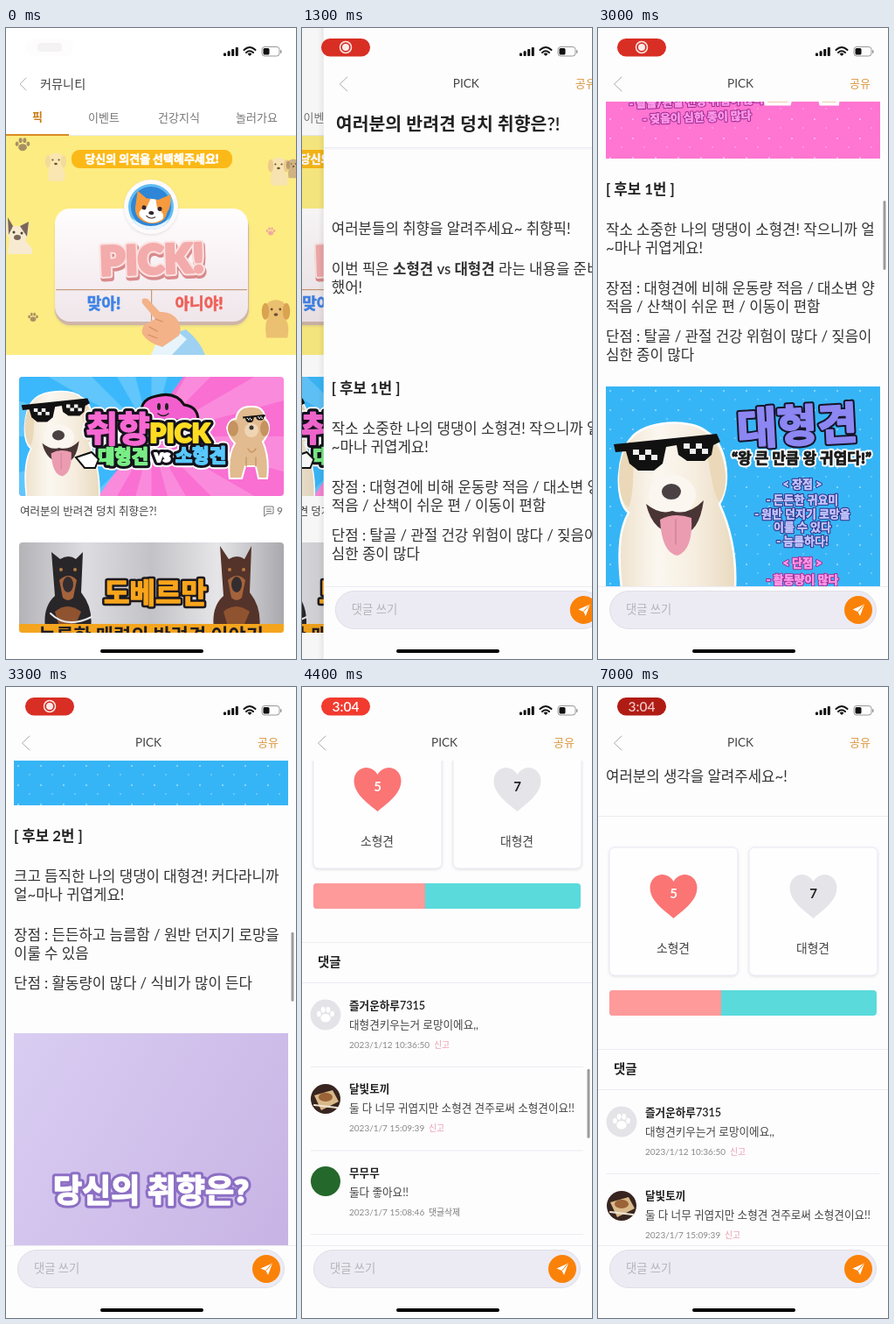
Write an HTML page that moves like this. It is 332 by 720 pixels and loops after 7100 ms.

```html
<!DOCTYPE html>
<html lang="ko">
<head>
<meta charset="utf-8">
<style>
html, body { margin: 0; width: 100%; height: 100%; overflow: hidden; background: #fff }
svg { display: block; width: 332px; height: 720px; font-family: Lato, 'Noto Sans CJK KR', 'Noto Sans CJK', sans-serif }
text { white-space: pre }
</style>
</head>
<body>
<svg id="stage" viewBox="0 0 332 720"></svg>
<script>
const LOOP = 7100;

// Drawing helpers: each returns SVG markup.
const rect = (x, y, w, h, fill, r = 0, more = '') =>
  `<rect x="${x}" y="${y}" width="${w}" height="${h}" rx="${r}" fill="${fill}" ${more}/>`;
const oval = (x, y, rx, ry, fill, more = '') =>
  `<ellipse cx="${x}" cy="${y}" rx="${rx}" ry="${ry}" fill="${fill}" ${more}/>`;
const disc = (x, y, r, fill, more) => oval(x, y, r, r, fill, more);
const path = (d, fill, more = '') => `<path d="${d}" fill="${fill}" ${more}/>`;
const line = (d, color, w = 1) => path(d, 'none', `stroke="${color}" stroke-width="${w}" stroke-linecap="round" stroke-linejoin="round"`);
const group = (transform, body, more = '') => `<g transform="${transform}" ${more}>${body}</g>`;
const text = (s, x, y, size, fill = '#333', weight = 400, anchor = 'start', more = '') =>
  `<text x="${x}" y="${y + size * .36}" font-size="${size}" fill="${fill}" font-weight="${weight}" text-anchor="${anchor}" ${more}>${s}</text>`;
const mid = (s, x, y, size, fill, weight, more) => text(s, x, y, size, fill, weight, 'middle', more);
const stroked = (s, x, y, size, color, w) =>
  mid(s, x, y, size, color, 900, `stroke="${color}" stroke-width="${w}" stroke-linejoin="round"`);
// Heavy lettering: thickened glyphs over a wider edge.
const outlined = (s, x, y, size, fill, edge = '#111', w = 4) => {
  const bold = size * .045;
  return stroked(s, x, y, size, edge, w + bold) + stroked(s, x, y, size, fill, bold);
};
const rule = (y, x = 0, w = 332) => rect(x, y, w, 1, '#ececf1');

const paw = (x, y, s, fill) => group(`translate(${x} ${y}) scale(${s})`,
  oval(0, 4, 6, 5, fill) + oval(-8, -1, 2.4, 3.4, fill) + oval(-3, -6, 2.5, 3.6, fill) +
  oval(3, -6, 2.5, 3.6, fill) + oval(8, -1, 2.4, 3.4, fill));
const heart = (x, y, s, fill) => group(`translate(${x} ${y}) scale(${s})`,
  path('M0 25C-9 17-27 6-27-10C-27-20-19-25-13-25C-7-25-2-21 0-17C2-21 7-25 13-25C19-25 27-20 27-10C27 6 9 17 0 25Z', fill));
const star = (x, y, r, fill) => {
  const points = Array.from({ length: 10 }, (_, i) => {
    const a = i * Math.PI / 5 - 1.4, d = i % 2 ? r / 2 : r;
    return `${(x + d * Math.cos(a)).toFixed(1)},${(y + d * Math.sin(a)).toFixed(1)}`;
  });
  return `<polygon points="${points.join(' ')}" fill="${fill}" stroke="${fill}" stroke-width="2" stroke-linejoin="round"/>`;
};
const rays = (cx, cy, radius, fill) => path(Array.from({ length: 12 }, (_, i) => {
  const at = a => `L${(cx + radius * Math.cos(a)).toFixed(1)} ${(cy + radius * Math.sin(a)).toFixed(1)}`;
  return `M${cx} ${cy}${at(i * Math.PI / 6)}${at(i * Math.PI / 6 + .26)}Z`;
}).join(''), fill);
const shades = (x, y, w) => group(`translate(${x} ${y}) scale(${w / 122})`,
  path('M0 12L118 0L122 9L114 13L112 24L104 31H84L74 24L72 13L60 15L56 34L46 42H28L18 34L14 20L2 21Z', '#111') +
  path('M22 18h7v6h7v6h-7v-6h-7zM36 18h7v6h7v6h-7v-6h-7zM80 11h7v6h7v6h-7v-6h-7zM94 11h7v6h7v6h-7v-6h-7z', '#eee'));

// Head and chest, drawn on a 150 x 230 area.
const labrador =
  path('M18 230C12 180 18 158 26 144C8 130 14 74 28 60C44 38 98 36 116 52C136 62 146 108 130 134C142 160 150 190 148 230Z', 'url(#fur)', 'stroke="#fff" stroke-width="2.5"') +
  path('M28 62C12 80 10 126 26 138C34 118 29 88 35 70ZM116 56C138 72 143 116 130 132C119 116 121 86 111 64Z', '#ead8b8') +
  oval(76, 124, 27, 23, '#fbf7f0') +
  path('M46 134Q62 147 76 142Q94 148 112 130Q106 172 82 168Q54 168 46 134Z', '#4a3535') +
  path('M62 152Q78 143 98 150Q100 186 82 193Q64 190 62 152Z', '#eb9cb0') +
  line('M80 152V180', '#d4819a', 1.5) + oval(75, 120, 11, 9, '#4a4143') + shades(9, 54, 122);

const poodle =
  path('M256 514Q253 488 262 474Q254 466 253 456Q256 446 263 446Q266 431 281 432Q295 431 297 446Q303 452 300 462Q297 469 294 472Q302 490 299 514H289L286 500H274L270 514Z', '#e2bb90', 'stroke="#fff" stroke-width="2"') +
  oval(260, 457, 6, 9, '#c4935f') + oval(296, 457, 5, 9, '#c4935f') + disc(281, 459, 8, '#efd5b4') +
  disc(281, 456, 2.5, '#333') + shades(271, 441, 26) + line('M277 480q4 8 9 0M275 490v10M286 490v10', '#c99a68', 1.5);

const lettering = (halo, fill) => [
  ['취향', 128, 458, 40, '#f768d2'], ['PICK', 199, 462, 30, '#ffdc22'],
  ['대형견', 134, 488, 21, '#79ee85'], ['vs', 179, 488, 19, '#fff'], ['소형견', 223, 487, 21, '#58c8ff']
].map(([s, x, y, size, color]) => stroked(s, x, y, size, fill || color, halo)).join('');
const pickArt =
  group('translate(12 388) scale(.64)', labrador) + poodle +
  path('M156 448Q150 424 172 420Q194 414 204 430Q220 432 220 448Z', '#f45fd0', 'stroke="#111" stroke-width="3"') +
  lettering(12, '#fff') + lettering(8, '#15121c') + lettering(1.8) +
  oval(175, 432, 2, 4, '#222') + oval(184, 432, 2, 4, '#222') + line('M174 440q6 5 12 0', '#222', 1.5) +
  path('M80 490L98 484L106 492L102 502H90Z', '#fff', 'stroke="#111" stroke-width="2"');
const pickBack = (x, y, w, h) => rect(x, y, w, h, '#f96fd2') +
  path(`M${x} ${y}h${w * .62}L${x + w * .3} ${y + h}H${x}Z`, '#3bb8fb') + rays(x + w / 2, y + h / 2, 320, '#ffffff30');

const babyDog = (x, y, s, fill, ear) => group(`translate(${x} ${y}) scale(${s})`,
  path('M-9 22Q-12 4-5 2H7Q14 8 11 22Z', fill) + oval(0, -4, 11, 10, fill) +
  oval(-10, -3, 3.5, 8, ear) + oval(10, -3, 3.5, 8, ear) +
  disc(-4, -5, 1.2, '#6b5138') + disc(4, -5, 1.2, '#6b5138') + oval(0, 0, 2, 1.5, '#6b5138'));
const frenchie = path('M2 258L4 240Q-2 232 2 216L8 226H16L26 221Q27 236 22 242L30 252V258Z', '#f7ead0') +
  path('M2 216L8 226L3 236ZM26 221L16 226L24 238Z', '#7a675a') + disc(9, 233, 1.5, '#443') + disc(18, 234, 1.5, '#443') + oval(13, 239, 4, 3, '#7a675a');

const corgi = disc(166, 204, 31, '#fdfafb', 'filter="url(#soft)"') + disc(166, 204, 26, '#62bdf2') + disc(166, 204, 23, '#2f86d6') +
  group('rotate(8 166 206)',
    path('M148 188L159 195H173L186 187Q189 200 185 208Q184 222 167 223Q150 222 148 208Z', '#f59a3e') +
    path('M164 195h6l3 10q10 4 8 11q-14 12-27 0q-3-7 7-11z', '#fff') +
    disc(158, 206, 2.5, '#33252b') + disc(176, 205, 2.5, '#33252b') + oval(167, 211, 3, 2, '#33252b') +
    line('M162 215Q167 219 172 215', '#33252b')) +
  path('M144 217Q166 235 188 217Q180 231 166 230Q151 230 144 217Z', '#e8f3ff');

const hero = rect(0, 123, 332, 250, '#fdec82') +
  paw(19, 133, .8, '#a99064') + paw(303, 232, .5, '#f0a9a0') + paw(31, 330, .55, '#a99064') +
  babyDog(57, 155, .9, '#f9e6b0', '#f4db9a') + babyDog(312, 160, .9, '#f7e3b0', '#eccb8c') + babyDog(329, 158, .6, '#d0b283', '#b59a6d') +
  frenchie + babyDog(309, 327, 1.2, '#ebc070', '#d9a352') +
  rect(75, 139, 184, 21, '#fbb917', 9) + stroked('당신의 의견을 선택해주세요!', 167, 149.5, 13, '#fff', .6) +
  rect(56, 210, 222, 129, '#cfb5a8', 18, 'filter="url(#soft)"') + rect(56, 206, 221, 129, 'url(#board)', 17) +
  rect(57, 298, 219, 1.2, '#c79a78') + rect(166, 298, 1.2, 36, '#c79a78') +
  corgi +
  group('rotate(-2 167 264)', stroked('PICK!', 168, 267, 46, '#d98a8c', 8) + stroked('PICK!', 167, 264, 46, '#fbe3e1', 7) + stroked('PICK!', 167, 264, 46, '#f3abab', 3)) +
  stroked('맞아!', 112, 315, 18, '#3f83e6', .6) + stroked('아니야!', 221, 315, 18, '#ee6059', .6) +
  path('M184 351L206 344Q222 357 228 373H171Z', '#9fd2f2') + path('M171 362L196 346L207 355L190 373H166Z', '#e7f4fc') +
  path('M156 314Q154 307 162 309L176 324Q190 323 197 334Q202 344 198 351L179 364Q162 359 156 349Q154 340 163 336L171 332Z', '#f3b288') +
  line('M164 341l9 5M163 350l10 4M171 332l8 3', '#d68c66', 1.2);

const doberman = (x, ear, coat) => group(`translate(${x} 588)`,
  path(`M-24 104Q-30 74-14 60L-18 ${ear}L-8 18Q2 12 10 18L18 ${ear}L16 56Q32 76 26 104Z`, coat) +
  path('M-9 42Q2 32 11 42L7 62Q1 68-5 62Z', '#a4633b') + oval(1, 47, 6, 9, '#332d30') +
  disc(-7, 30, 2, '#b87a43') + disc(9, 30, 2, '#b87a43') + path('M-14 78Q0 66 16 78L10 92H-10Z', '#8f532f'));

const list =
  rect(0, 0, 332, 720, '#fff') + line('M23 57L16 64L23 71', '#b5b5b5') + text('커뮤니티', 39, 63.5, 14.2, '#444') +
  mid('픽', 36, 101, 13, '#c97a14', 700) + mid('이벤트', 112, 102, 13, '#777') + mid('건강지식', 198, 102, 13, '#777') + mid('놀러가요', 287, 102, 13, '#777') +
  rule(122) + rect(0, 121, 72, 2, '#d98a24') + hero +
  `<g clip-path="url(#card1)">${pickBack(15, 398, 303, 136)}${pickArt}</g>` +
  text('여러분의 반려견 덩치 취향은?!', 16, 551, 12.5, '#444') +
  line('M296 546h10v8h-7l-3 3zM298.500 549h5M298.500 551.500h5', '#777') + text('9', 310, 551, 12, '#666') +
  `<g clip-path="url(#card2)">${rect(15, 587, 303, 103, 'url(#street)')}${doberman(70, 10, '#29262a')}${doberman(263, 3, '#54332a')}` +
  line('M51 668Q69 686 98 672', '#e8e8ea', 2) + outlined('도베르만', 171, 644, 32, '#f8a51c', '#1d1a20', 5) +
  rect(15, 680, 303, 10, '#f5a51d') + mid('늠름한 매력의 반려견 이야기', 166, 693, 22, '#211d22', 900) + '</g>';

// Detail page content, laid out as if every picture had loaded.
const para = (y, ...rows) => rows.map((s, i) => text(s, 9, y + i * 21, 16.75)).join('');
const heading = (s, y) => text(s, 9, y, 16.75, '#222', 700);
const note = (rows, x) => rows.map(([s, y, fill, edge]) => outlined(s, x, y, 13, fill, edge, 2)).join('');
const poster = (y, fill, title, quote, pet, rows, titleColor) => group(`translate(9 ${y})`,
  rect(0, 0, 314, 314, fill) + rect(0, 0, 314, 314, 'url(#dots)') + pet +
  group('rotate(-3 220 45)', outlined(title, 219, 45, 50, titleColor, '#17152b', 4)) +
  outlined(quote, 224, 82, 17, '#191919', '#fff', 4) + note(rows, 225), 'clip-path="url(#square)"');

const LILAC = '#c3c6ff', PINK = '#ff9bea', NAVY = '#2c2d86', PLUM = '#a12a94';
const bigPoster = poster(1176, '#36b5f6', '대형견', '“왕 큰 만큼 왕 귀엽다!”', labrador, [
  ['&lt; 장점 &gt;', 111, LILAC, NAVY], ['- 든든한 귀요미', 129, LILAC, NAVY], ['- 원반 던지기 로망을', 145, LILAC, NAVY],
  ['이룰 수 있다', 160, LILAC, NAVY], ['- 늠름하다!', 176, LILAC, NAVY], ['&lt; 단점 &gt;', 201, PINK, PLUM],
  ['- 활동량이 많다', 220, PINK, PLUM], ['- 식비가 많이 든다', 237, PINK, PLUM]], '#8c87f2');
const smallPoster = group('translate(9 602)',
  rect(0, 0, 314, 314, '#ff75d2') + rect(0, 0, 314, 314, 'url(#dots)') +
  group('translate(-303 -725) scale(1.9)', poodle) +
  outlined('소형견', 95, 46, 50, '#ffdb55', '#17152b', 4) + outlined('“작은 만큼 더 귀엽다!”', 100, 84, 17, '#191919', '#fff') +
  note([['&lt; 장점 &gt;', 122, LILAC, NAVY], ['- 운동량이 적다', 142, LILAC, NAVY], ['- 산책이 쉬운 편', 160, LILAC, NAVY],
    ['- 이동이 편하다', 178, LILAC, NAVY], ['&lt; 단점 &gt;', 222, PINK, PLUM]], 100) +
  group('rotate(-2 100 255)', note([['- 탈골/관절 건강 위험이 많다', 249, PINK, PLUM], ['- 짖음이 심한 종이 많다', 267, PINK, PLUM]], 104)),
  'clip-path="url(#square)"');

const cat = path('M264 2285Q260 2260 270 2251Q262 2238 267 2226L272 2229Q282 2224 292 2229L298 2225Q302 2240 296 2250Q304 2264 299 2287H267Z', '#fff', 'stroke="#b9a7aa"') +
  disc(276, 2241, 1.4, '#444') + disc(289, 2241, 1.4, '#444') + line('M280 2245q2 2 3 0q2 2 3 0', '#665') +
  line('M271 2253Q283 2262 296 2253', '#e9686c', 2) + heart(283, 2261, .14, '#ed3d49') +
  heart(277, 2231, .27, '#ed3d49') + heart(292, 2230, .27, '#ed3d49') + line('M268 2262q-5-4-4-12', '#c9b9bb');
const purple = rect(9, 1750, 314, 537, 'url(#lilac)') + star(41, 2226, 12, '#f3b6df') + star(51, 2257, 3, '#e9b8ea') +
  star(242, 2226, 9, '#f28fae') + star(226, 2245, 6, '#c697ee') + star(235, 2264, 4, '#f1cc9d') +
  outlined('당신의 취향은?', 166, 1930, 36, '#fff', '#8c6fc4', 6) + heart(110, 2040, 1.6, '#fb8ba2') + heart(220, 2040, 1.6, '#8fd9f0') + cat;

const voteCard = (x, n, label, fill, ink) => rect(x, 2525, 147, 146, '#fefeff', 6, 'stroke="#e9e8f3" filter="url(#soft)"') +
  heart(x + 73.500, 2581, 1, fill) + mid(n, x + 73.500, 2578, 15, ink, 700) + mid(label, x + 73, 2640, 13.8, '#444');
const comment = (y, name, body, date, action, avatar) =>
  avatar + text(name, 54, y, 12.6, '#222', 600) + text(body, 54, y + 22, 12.6, '#444') + text(date, 54, y + 45, 10, '#888') +
  text(action, date.length > 17 ? 151 : 145, y + 45, 9.8, action === '신고' ? '#e69aae' : '#777') + rule(y + 70, 10, 312);
const meal = disc(27, 2934, 17, '#38251f') + path('M14 2930L35 2924L42 2937L22 2947Z', '#d9b98a') + oval(27, 2932, 8, 5, '#9b6337') + line('M14 2941L40 2944', '#efe4d2', 2);

const intro = para(499, '여러분들의 취향을 알려주세요~ 취향픽!') +
  text('이번 픽은 <tspan font-weight="600">소형견 vs 대형견</tspan> 라는 내용을 준비', 9, 545, 16.75) + text('했어!', 9, 566, 16.75);
const body = heading('[ 후보 1번 ]', 951) +
  para(997, '작소 소중한 나의 댕댕이 소형견! 작으니까 얼', '~마나 귀엽게요!') +
  para(1064, '장점 : 대형견에 비해 운동량 적음 / 대소변 양', '적음 / 산책이 쉬운 편 / 이동이 편함') +
  para(1119, '단점 : 탈골 / 관절 건강 위험이 많다 / 짖음이', '심한 종이 많다') +
  `<g class="picture">${bigPoster}</g>` + heading('[ 후보 2번 ]', 1525) +
  para(1571, '크고 듬직한 나의 댕댕이 대형견! 커다라니까', '얼~마나 귀엽게요!') +
  para(1638, '장점 : 든든하고 늠름함 / 원반 던지기 로망을', '이룰 수 있음') +
  para(1693, '단점 : 활동량이 많다 / 식비가 많이 든다') + purple +
  para(2322, '여러분은 대형견과 소형견 중 어느 쪽이 더 취', '향이신가요?') +
  para(2377, '왕 귀여운 대형견과 작고 소중한 소형견..둘 다', '너무너무 귀엽고 소중해..!') +
  para(2444, '여러분의 생각을 알려주세요~!') + rule(2489) +
  voteCard(13, 5, '소형견', '#fb7575', '#fff') + voteCard(173, 7, '대형견', '#e5e4e8', '#222') +
  rect(13, 2688, 306, 29, '#5bdadb', 4) + path('M141 2688H17Q13 2688 13 2692V2713Q13 2717 17 2717H141Z', '#fe9a9a') +
  rule(2755) + text('댓글', 18, 2778, 14.5, '#222', 600) + rule(2801) +
  comment(2827, '즐거운하루7315', '대형견키우는거 로망이에요,,', '2023/1/12 10:36:50', '신고', disc(27, 2838, 17.5, '#e4e3e7') + paw(27, 2838, .95, '#fff')) +
  comment(2922.5, '달빛토끼', '둘 다 너무 귀엽지만 소형견 견주로써 소형견이요!!', '2023/1/7 15:09:39', '신고', meal) +
  comment(3018, '무무무', '둘다 좋아요!!', '2023/1/7 15:08:46', '댓글삭제', disc(27, 3028, 17, '#24682c'));

const detail = rect(-6, 0, 6, 720, 'url(#edge)') + rect(0, 0, 332, 720, '#fefdfe') +
  `<g clip-path="url(#view)"><g id="scroll">` +
  text('여러분의 반려견 덩치 취향은?!', 14, 109.500, 20.5, '#222', 600) + rule(136) + rect(0, 137, 332, 2, '#f5f5f9') +
  `<g class="picture">${pickBack(9, 150, 314, 314)}${group('translate(-6 -175) scale(1.035)', pickArt)}${smallPoster}</g>` +
  `<g id="intro">${intro}</g><g id="body">${body}</g></g></g>` +
  line('M27 56L18.500 64L27 72', '#aaa') + mid('PICK', 163, 63.500, 13.6, '#444') + mid('공유', 300, 63.500, 13, '#d8963c') +
  rule(637) + rect(13.500, 642.500, 305, 43, '#ecebf3', 21.500, 'stroke="#e0dfe6"') + text('댓글 쓰기', 32, 663.500, 13.3, '#b5b3b8') +
  disc(298, 664, 16, '#fb8208') + path('M305 657.500L300 671L297.500 666L291.500 663.500Z', '#fff') + line('M298 665.500L304 658.500', '#fb8208') +
  rect(326.500, 0, 3, 79, '#9b9b9e', 1.500, 'id="bar"');

const status = [0, 1, 2, 3].map(i => rect(249 + i * 4.6, 28.500 - i * 2.2, 3, 3.500 + i * 2.2, '#111', .8)).join('') +
  line('M272.500 25Q279 19 285.500 25M275 28Q279 24.500 283 28', '#111', 2) + path('M276.500 29.500Q279 27.500 281.500 29.500L279 32Z', '#111') +
  rect(293, 21.500, 20, 10.500, 'none', 3, 'stroke="#999"') + rect(294.500, 23, 7, 7.500, '#111', 1.500) + rect(314, 25, 1.500, 4, '#999', .7) +
  rect(36, 17, 28, 10, '#f5f4f5', 4) +
  `<g id="pill">${rect(22, 12, 56, 20.500, '#f23a2f', 10, 'id="pillFill"')}` +
  `<g id="record">${disc(50, 22, 6.500, 'none', 'stroke="#fff" stroke-width="1.5"')}${disc(50, 22, 4, '#fff')}</g>` +
  `${mid('3:04', 50, 22, 15.5, '#fff', 600, 'id="clock"')}</g>` + rect(108, 709, 118, 4, '#000', 2);

const clip = (id, x, y, w, h, r = 0) => `<clipPath id="${id}">${rect(x, y, w, h, '#000', r)}</clipPath>`;
const fade = (id, more, ...colors) => `<linearGradient id="${id}" ${more}>` +
  colors.map((c, i) => `<stop offset="${i / (colors.length - 1)}" stop-color="${c}"/>`).join('') + '</linearGradient>';
const defs = clip('view', 0, 84, 332, 553) + clip('card1', 15, 398, 303, 136, 4) + clip('card2', 15, 587, 303, 103, 4) + clip('square', 0, 0, 314, 314) +
  fade('street', '', '#b4b3b7', '#dddce0', '#c3c2c6', '#e6e5e8', '#a9a8ad') + fade('lilac', 'x2="1" y2="1"', '#d9cdf2', '#c1aadf') + fade('edge', '', '#0000', '#0001') +
  fade('board', 'x2="0" y2="1"', '#fffdfe', '#f8f1f4', '#efe6ea') + fade('fur', '', '#efe2cc', '#fbf7f0', '#f6eddf', '#e9dabf') +
  '<filter id="soft" x="-10%" y="-10%" width="120%" height="125%"><feDropShadow dx="0" dy="1" stdDeviation="1.5" flood-color="#888" flood-opacity=".25"/></filter>' +
  `<pattern id="dots" width="26" height="22" patternUnits="userSpaceOnUse">${disc(5, 5, 1, '#fff8')}${disc(18, 15, .8, '#fff8')}</pattern>`;

const $ = id => document.getElementById(id);
$('stage').innerHTML = `<defs>${defs}</defs><g id="list">${list}${rect(0, 0, 332, 720, '#000', 0, 'id="dim"')}</g><g id="detail">${detail}</g>${status}`;
const pictures = document.querySelectorAll('.picture');

const clamp = v => Math.max(0, Math.min(1, v));
const moves = [
  [2450, 3000, 765, p => p ** 1.3],
  [3000, 3700, 2137, p => p],
  [3700, 4350, 2464, p => 1 - (1 - p) ** 3],
  [4850, 5450, 2342, p => p * p * (3 - 2 * p)]
];
const scrollAt = t => moves.reduce((y, [start, end, to, ease]) => y + (to - y) * ease(clamp((t - start) / (end - start))), 0);
const shift = (id, x, y) => $(id).setAttribute('transform', `translate(${x} ${y})`);
const opacity = (id, v) => $(id).setAttribute('opacity', v);

function draw(t) {
  let push = t < 1000 ? 0 : 1 - Math.exp((1000 - t) / 116);
  if (push > .997) push = 1;
  shift('list', -100 * push, 0);
  shift('detail', 332 * (1 - push), 0);
  opacity('detail', +(push > 0));
  opacity('dim', .04 * push);

  const loaded = t >= 1700, y = scrollAt(t);
  pictures.forEach(p => p.setAttribute('opacity', +loaded));
  shift('intro', 0, loaded ? 0 : -270);
  shift('body', 0, loaded ? 0 : -540);
  shift('scroll', 0, -y);
  shift('bar', 0, 89 + y * .1407);
  opacity('bar', clamp((t - 2450) / 100) * clamp((6850 - t) / 300));

  const recording = t < 3350, press = clamp((t - 6650) / 300);
  const dark = recording ? .4 : press;
  opacity('pill', clamp(t / 200));
  opacity('record', recording ? .9 : 0);
  opacity('clock', recording ? 0 : 1 - .25 * press);
  $('pillFill').setAttribute('fill', `rgb(${242 - 66 * dark} ${58 - 30 * dark} ${47 - 27 * dark})`);
}

const begin = performance.now();
function tick() {
  draw((performance.now() - begin) % LOOP);
  requestAnimationFrame(tick);
}
tick();
</script>
</body>
</html>
```
